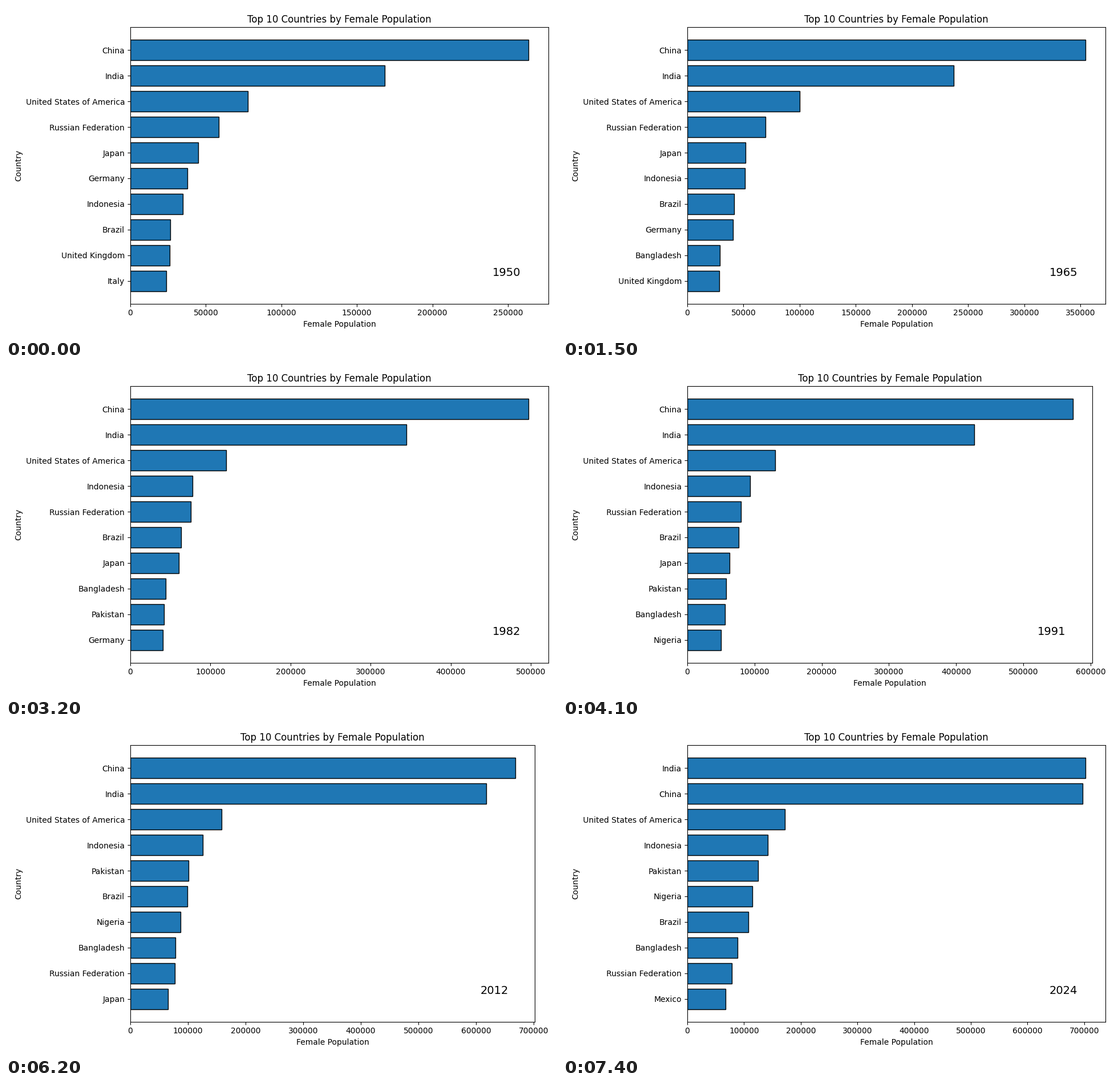
These frames come from a looping animation (966 by 580 pixels, 7.5 s). A matplotlib script:

```python
import numpy as np
import matplotlib.pyplot as plt
from matplotlib.animation import FuncAnimation

FIRST, LAST, TOP = 1950, 2024, 10

plt.rcParams["font.family"] = "DejaVu Sans"

# Female population in millions at the years below; short rows stay flat afterwards.
YEARS = [1950, 1957, 1965, 1974, 1982, 1991, 2001, 2012, 2018, 2024]
MILLIONS = {
    "India": [168.35, 195.5, 237.0, 289.34, 345.0, 427.0, 520.7, 617.8, 661.0, 702.19],
    "United States of America": [77.73, 88.3, 100.1, 111.43, 120.0, 130.76, 143.3, 158.83, 167.0, 172.49],
    "Russian Federation": [58.67, 64.2, 69.57, 72.74, 75.6, 79.7, 78.08, 77.7, 78.3, 78.1],
    "Japan": [44.84, 48.2, 51.6, 57.1, 60.7, 62.7, 64.52, 65.49, 64.9, 63.4],
    "Germany": [37.93, 38.9, 40.43, 41.3, 40.9, 41.2],
    "Indonesia": [34.75, 41.6, 51.08, 64.9, 77.6, 93.6, 109.9, 125.89, 134.6, 141.63],
    "Brazil": [26.46, 32.9, 41.84, 52.77, 63.6, 76.36, 89.43, 99.21, 104.2, 107.99],
    "United Kingdom": [26.08, 26.7, 28.28, 28.9, 28.9],
    "Italy": [23.92, 24.95, 26.4, 28.0, 28.8],
    "Bangladesh": [19.4, 23.1, 28.78, 37.1, 44.2, 56.16, 66.92, 78.68, 83.3, 88.88],
    "Pakistan": [17.9, 20.6, 25.0, 31.74, 41.9, 57.84, 77.29, 101.36, 112.0, 124.4],
    "Nigeria": [18.0, 20.6, 24.5, 30.6, 38.9, 50.46, 65.32, 87.09, 100.5, 114.76],
    "Mexico": [13.9, 17.0, 21.6, 28.0, 35.3, 42.6, 50.6, 59.5, 64.0, 67.68],
}
# China needs finer steps around 1960.
CHINA_YEARS = [1950, 1954, 1957, 1959, 1961, 1963, 1965, 1970, 1974, 1978,
               1982, 1986, 1991, 1998, 2001, 2012, 2018, 2021, 2024]
CHINA = [263.64, 287.0, 306.0, 317.2, 319.2, 333.0, 354.37, 400.5, 441.64, 469.0,
         497.2, 529.0, 574.0, 611.3, 625.28, 668.7, 692.5, 698.2, 696.6]


def smooth(year, xs, ys):
    """Cubic Hermite curve through the given points."""
    xs, ys = np.array(xs, float), np.array(ys, float)
    slopes = np.gradient(ys, xs)
    year = np.clip(year, xs[0], xs[-1])
    i = np.clip(np.searchsorted(xs, year, side="right") - 1, 0, len(xs) - 2)
    h = xs[i + 1] - xs[i]
    t = (year - xs[i]) / h
    return (ys[i] * (1 + 2 * t) * (1 - t) ** 2
            + ys[i + 1] * t * t * (3 - 2 * t)
            + h * t * (1 - t) * (slopes[i] * (1 - t) - slopes[i + 1] * t))


def ranking(year):
    """Largest countries of a year, smallest first."""
    values = {name: smooth(year, YEARS[:len(row)], row)
              for name, row in MILLIONS.items()}
    values["China"] = smooth(year, CHINA_YEARS, CHINA)
    return sorted(values.items(), key=lambda item: item[1])[-TOP:]


fig, ax = plt.subplots(figsize=(9.66, 5.8), dpi=100)


def draw(frame):
    year = FIRST + frame
    names, values = zip(*ranking(year))
    ax.clear()
    ax.barh(names, np.array(values) * 1000, color="#1f77b4", edgecolor="black")
    ax.set_title("Top 10 Countries by Female Population")
    ax.set_xlabel("Female Population")
    ax.set_ylabel("Country")
    ax.text(0.9, 0.1, str(year), transform=ax.transAxes, ha="center", fontsize=14)
    # Same starting layout every time, so frames do not depend on each other.
    fig.subplots_adjust(left=0.218, right=0.985, bottom=0.0966, top=0.938)
    fig.tight_layout()


anim = FuncAnimation(fig, draw, frames=LAST - FIRST + 1, interval=100,
                     repeat=True, repeat_delay=0)
plt.show()
```
